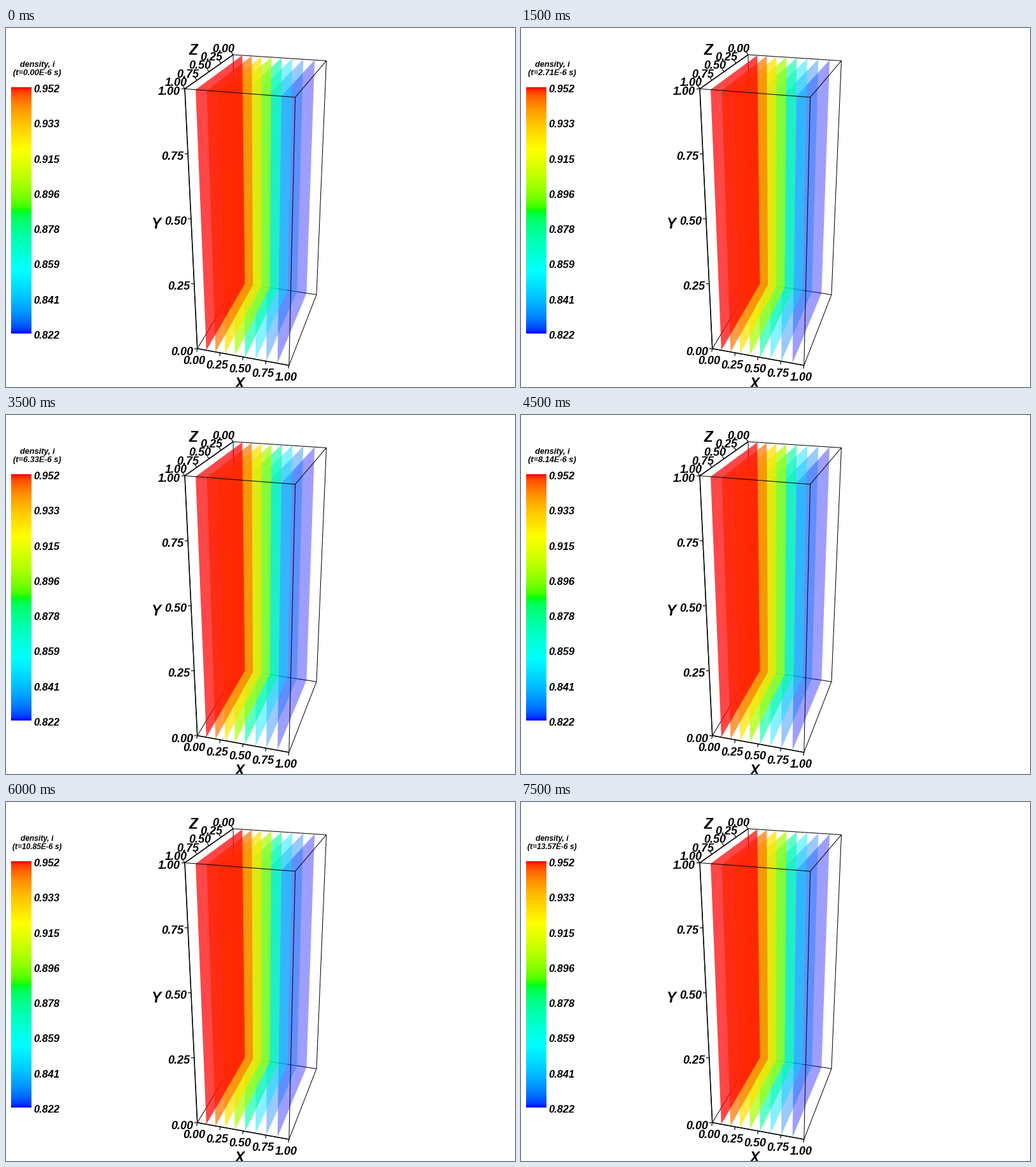
These frames come from a looping animation (800x564 px, 8000 ms). A matplotlib script:

```python
import colorsys
from itertools import product

import numpy as np
import matplotlib.pyplot as plt
from matplotlib.animation import FuncAnimation
from matplotlib.patches import Polygon

W, H, DPI = 800, 564, 72
FRAMES, INTERVAL, DT = 16, 500, 0.9045
DEPTH = 0.87   # how much nearer the right face is than the left one

plt.rcParams["font.family"] = "Liberation Sans"
fig = plt.figure(figsize=(W / DPI, H / DPI), dpi=DPI, facecolor="white")
ax = fig.add_axes([0, 0, 1, 1])
ax.axis("off")

# left and right ends of the box edges that run along x, keyed by (y, z)
EDGES = {
    (0, 1): ((300.7, 503.7), (444.8, 530)),
    (1, 1): ((281, 95.5), (454.6, 108.8)),
    (1, 0): ((357, 42), (503.5, 51.5)),
    (0, 0): ((363.3, 400), (488, 419)),
}


def project(x, y, z):
    """Screen position, foreshortened along x."""
    left, right = np.array(EDGES[y, z])
    s = x * DEPTH / (1 - x + x * DEPTH)
    return left + (right - left) * s


def rainbow(t):
    """Red to blue, with a square-root ramp on each channel."""
    return np.sqrt(colorsys.hsv_to_rgb(t * 2 / 3, 1, 1))


def line(a, b, lw=1.0, z=5):
    ax.plot(*zip(a, b), color="black", lw=lw, zorder=z, solid_capstyle="butt")


def label(x, y, s, size, ha="center", va="center_baseline"):
    return ax.text(x, y, s, fontsize=size, ha=ha, va=va, weight="bold",
                   style="italic", color="black", zorder=8)


def draw_box():
    for a in product((0, 1), repeat=3):
        for i in range(3):
            if a[i] == 0:
                b = a[:i] + (1,) + a[i + 1:]
                line(project(*a), project(*b), z=1 if not any(a) else 5)


def draw_slices(n=8):
    for i in range(1, n + 1):
        u = (i - 1) / (n - 1)
        alpha = 0.38 + 0.34 / (1 + np.exp(2 * (i - 5.5)))
        quad = [project(i / (n + 1), y, z) for y, z in EDGES]
        ax.add_patch(Polygon(quad, facecolor=rainbow(u * u * (3 - 2 * u)),
                             alpha=alpha, lw=0, zorder=4 - i / 10))


def draw_axis(start, end, tick, first, last):
    """Axis with five evenly spaced ticks; first/last are label centres."""
    ends = np.array([project(*start), project(*end)])
    labels = np.array([first, last])
    line(*ends, 1.5, 6)
    for t in np.linspace(0, 1, 5):
        mix = np.array([1 - t, t])
        p = mix @ ends
        line(p, p + np.array(tick), 1.2, 6)
        label(*(mix @ labels), f"{t:.2f}", 18)


def draw_colorbar(top=93, bottom=480, steps=128):
    strip = [[rainbow(t)] for t in np.linspace(0, 1, steps)]
    ax.imshow(strip, extent=(8, 40, bottom, top), aspect="auto",
              interpolation="nearest", zorder=2)
    for t in np.linspace(0, 1, 8):
        label(43, top + 2 + (bottom - top) * t, f"{.952 - .13 * t:.3f}", 16.4,
              ha="left")


draw_box()
draw_slices()
draw_axis((0, 0, 1), (1, 0, 1), (-1, 5), (296, 521.5), (440, 548))
draw_axis((0, 0, 1), (0, 1, 1), (-5, .2), (276.5, 507), (256.5, 98.5))
draw_axis((0, 1, 0), (0, 1, 1), (-2.9, -4.1), (342, 31.5), (267, 84.5))
label(367, 557, "X", 22.5)
label(236, 306, "Y", 22.5)
label(294, 33.5, "Z", 22.5)
draw_colorbar()

name = label(49, 60.5, "density, i", 12.8, va="baseline")
clock = label(48.5, 74, "", 12.8, va="baseline")

ax.set_xlim(0, W)
ax.set_ylim(H, 0)


def update(k):
    t = k * DT
    clock.set_text(f"(t={t:.2f}E-6 s)")
    for text in (name, clock):
        text.set_fontsize(12 if t >= 10 else 12.8)
    return name, clock


anim = FuncAnimation(fig, update, frames=FRAMES, interval=INTERVAL,
                     repeat=True, repeat_delay=0, blit=False)
plt.show()
```
